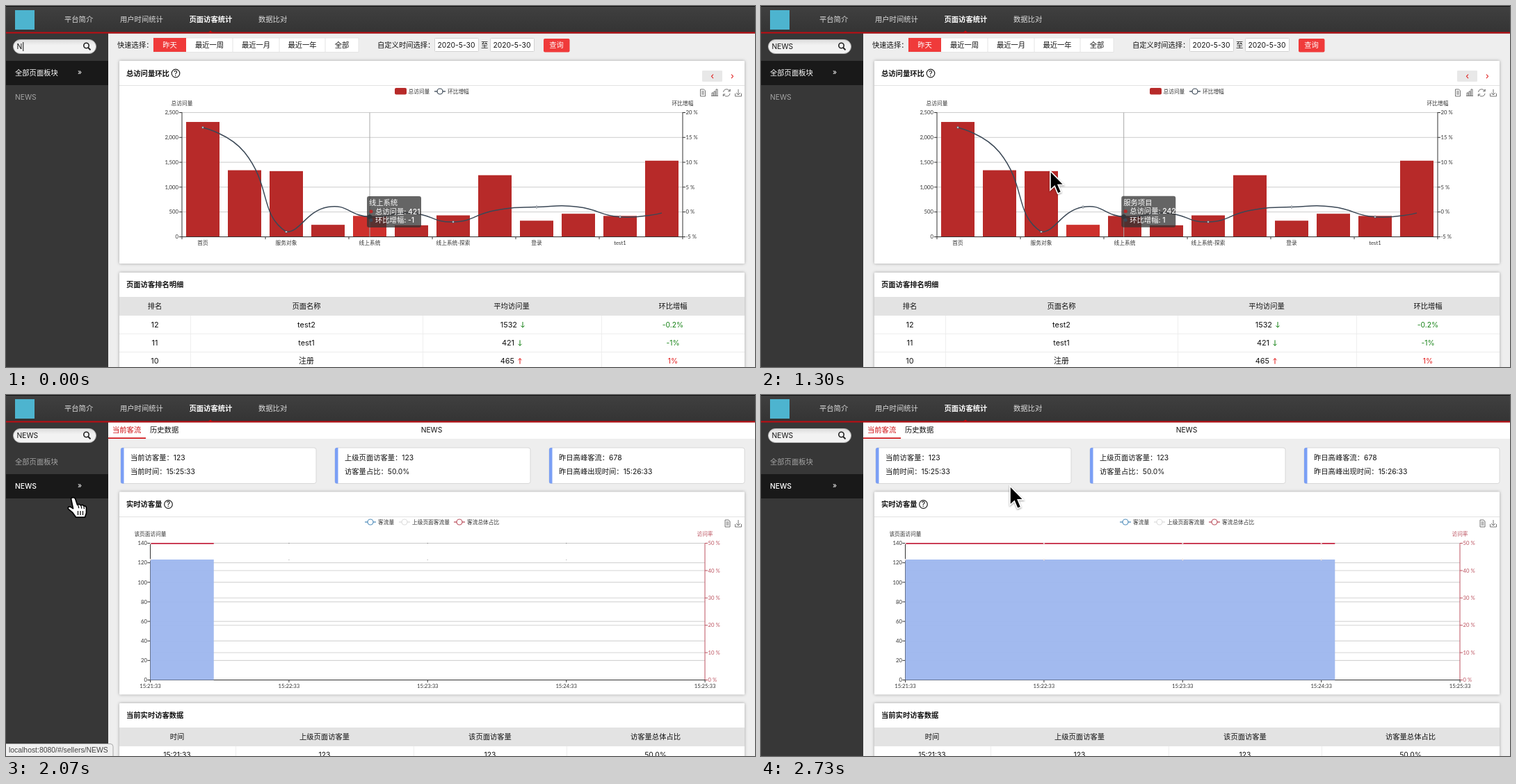
Animation, 1077 px wide and 520 px high, one loop 2.76 s. Source, as an HTML page:

```html
<!DOCTYPE html>
<html lang="zh-CN">
<head>
<meta charset="utf-8">
<style>
html, body { margin: 0; width: 100%; height: 100%; overflow: hidden; background: #eee; }
svg { display: block; width: 1077px; height: 520px; }
text { font: 10.3px Inter, "Noto Sans CJK SC", "Noto Sans CJK", sans-serif; white-space: pre; }
.m { text-anchor: middle; }
.e { text-anchor: end; }
.b { font-weight: 700; }
.w { font-weight: 500; }
.l { font-size: 10.9px; }
.s { font: 7.7px Lato, "Noto Sans CJK SC", "Noto Sans CJK", sans-serif; }
.u { font: 10.4px "Liberation Sans", sans-serif; }
.panel { fill: #fff; filter: drop-shadow(0 0 2px rgba(0,0,0,.32)); }
</style>
</head>
<body>
<svg id="stage" viewBox="0 0 1077 520">
  <defs>
    <linearGradient id="head" x2="0" y2="1"><stop stop-color="#404040"/><stop offset="1" stop-color="#343434"/></linearGradient>
    <linearGradient id="pill" x2="0" y2="1"><stop stop-color="#dcdcdc"/><stop offset=".4" stop-color="#f2f2f2"/></linearGradient>
  </defs>
</svg>
<script>
const RED = '#f03a3a', BAR = '#b72a29', HOT = '#cd302c', INK = '#333', NAVY = '#3b4856', ROSE = '#bc5360';
const LOOP = 2760, PAGE_SWITCH = 1930;
const stage = document.getElementById('stage');

const range = (n, fn) => Array.from({ length: n }, (_, i) => fn(i)).join('');
const text = (x, y, str, cls = '', fill = '#111') => {
  const size = /\bs\b/.test(cls) ? 7.7 : 10.3;
  return `<text x="${x}" y="${y + size * .36}" class="${cls}" fill="${fill}">${str}</text>`;
};
const rect = (x, y, w, h, fill, extra = '') =>
  `<rect x="${x}" y="${y}" width="${w}" height="${h}" fill="${fill}" ${extra}/>`;
const path = (d, stroke, width = 1, fill = 'none', extra = '') =>
  `<path d="${d}" stroke="${stroke}" stroke-width="${width}" fill="${fill}" ${extra}/>`;
const hline = (x1, x2, y, color, w = 1) => path(`M${x1} ${y}H${x2}`, color, w);
const vline = (x, y1, y2, color, w = 1) => path(`M${x} ${y1}V${y2}`, color, w);
const circle = (x, y, r, stroke, fill = '#fff', w = 1) =>
  `<circle cx="${x}" cy="${y}" r="${r}" stroke="${stroke}" fill="${fill}" stroke-width="${w}"/>`;
const panel = (x, y, w, h) => rect(x, y, w, h, '#fff', 'class="panel" rx="1"');
const group = (id, body, extra = '') => `<g id="${id}" ${extra}>${body}</g>`;

const title = (y, str, helpX) => text(173, y, str, 'b') + (helpX
  ? circle(helpX, y, 5.8, '#222', 'none', 1.2) + text(helpX, y, '?', 'm w', '#222') : '');
const ringLegend = (x, y, label, color, stroke = color) =>
  hline(x - 8, x + 8, y, color, 1.3) + circle(x, y, 4, stroke, '#fff', 1.2) + text(x + 11, y, label, 's', INK);

const docIcon = (x, y) => path(`M${x - 3.5} ${y - 5}h5l2 2v8h-7zM${x - 2} ${y - 2}h4m-4 2h4m-4 2h4`, '#666', .9);
const saveIcon = (x, y) => path(`M${x - 4.5} ${y + 1}v4h9v-4M${x} ${y - 5}v8m-3-3l3 3l3-3`, '#666', .9);

function table(y, name, seps, centers, heads) {
  return panel(163, y, 899, 160) + title(y + 17, name) + rect(163, y + 35, 899, 27, '#e3e3e3')
    + heads.map((h, i) => text(centers[i], y + 48.5, h, 'm')).join('')
    + seps.map(x => vline(x + .5, y + 62, 520, '#eee')).join('');
}

// ---------- Shared frame ----------
const navigation = rect(0, 0, 1077, 38, 'url(#head)') + rect(0, 0, 1077, 1, '#111')
  + rect(0, 37.5, 1077, 2, '#c00d12') + path('M291 38l3-2.5l3 2.5z', 'none', 0, '#c00d12')
  + rect(13, 6, 28, 28, '#4db4cf')
  + text(84, 19.5, '平台简介', '', '#ddd') + text(164, 19.5, '用户时间统计', '', '#ddd')
  + text(263.5, 19.5, '页面访客统计', 'b', '#fff') + text(363, 19.5, '数据比对', '', '#ddd');
const search = rect(10.5, 48.5, 119, 20, 'url(#pill)', 'rx="10" stroke="#b5b5b5"')
  + circle(115.5, 57, 3.7, '#222', 'none', 1.6) + path('M118.2 60l3.3 3.4', '#222', 2)
  + group('typed', '') + rect(0, 52, 1, 13, '#111', 'id="caret"');

function menu(active) {
  const item = (i, label, y) => (i === active ? rect(0, y - 17, 147, 35, '#191919') : '')
    + text(13, y, label, i === active ? 'w' : '', i === active ? '#fff' : '#a5a5a5')
    + (i === active ? text(103, y - 1, '»', '', '#fff') : '');
  return item(0, '全部页面板块', 96) + item(1, 'NEWS', 131);
}

// ---------- Overview page ----------
const visits = [2311, 1340, 1322, 242, 421, 232, 432, 1240, 325, 465, 421, 1532];
const growth = [17, 12, -4, 1, -1, -.2, -2, .3, 1, 1, -1, -.2];
const names = ['首页', '平台简介', '服务对象', '服务项目', '线上系统'];
const centerX = i => 283 + 60 * i;
const growthY = v => 296.7 - v * 7.16;
const points = growth.map((v, i) => [centerX(i), growthY(v)]);

function smoothLine(p) {
  const ys = p.map(q => q[1]), low = Math.min(...ys), high = Math.max(...ys);
  const clamp = y => Math.max(low, Math.min(high, y));
  let d = `M${p[0]}`, out = p[0];
  for (let i = 1; i < p.length; i++) {
    const [x, y] = p[i], prev = p[i - 1], next = p[i + 1];
    let into = p[i], leave = p[i];
    if (next) {
      const before = Math.hypot(x - prev[0], y - prev[1]), after = Math.hypot(next[0] - x, next[1] - y);
      const k = after / (before + after), vx = next[0] - prev[0], vy = next[1] - prev[1];
      into = [x - vx * .5 * (1 - k), clamp(y - vy * .5 * (1 - k))];
      leave = [x + vx * .5 * k, clamp(y + vy * .5 * k)];
    }
    d += `C${out} ${into} ${p[i]}`;
    out = leave;
  }
  return d;
}

function filters() {
  const labels = ['昨天', '最近一周', '最近一月', '最近一年', '全部'], edges = [212, 259, 326, 393, 459, 507];
  return text(160, 56, '快速选择：')
    + rect(212, 46, 295, 20.5, '#fff', 'stroke="#e2e2e2" stroke-width=".8"') + rect(212, 46, 47, 20, RED)
    + labels.map((s, i) => text((edges[i] + edges[i + 1]) / 2, 56, s, 'm', i ? '#111' : '#fff')
      + (i > 1 ? vline(edges[i], 46, 66, '#e4e4e4') : '')).join('')
    + text(534, 56, '自定义时间选择：')
    + [616, 696].map(x => rect(x + .5, 46.5, 63, 19, '#fff', 'stroke="#d2d2d2" rx="1"')
      + text(x + 31.5, 56, '2020-5-30', 'm')).join('')
    + text(683, 56, '至') + rect(773, 47, 37.5, 19.5, RED, 'rx="2"') + text(791.5, 56.5, '查询', 'm w', '#fff');
}

function overviewChart() {
  return panel(163, 79, 899, 292) + title(97, '总访问量环比', 244) + hline(163, 1062, 114.5, '#e2e2e2')
    + rect(1001, 93, 29, 16, '#e8e8e8', 'rx="1"')
    + path('M1017 98.5l-2.5 2.8l2.5 2.8M1043 98.5l2.5 2.8l-2.5 2.8', '#e02020', 1.1)
    + rect(559, 118, 17, 9.5, BAR, 'rx="2"') + text(578.5, 123, '总访问量', 's', INK)
    + ringLegend(624, 123, '环比增幅', NAVY)
    + docIcon(1002, 125) + saveIcon(1053, 125)
    + path('M1014 129.5h10M1015 129v-4h2v4M1018 129v-6h2v6M1021 129v-9h2v9', '#666', .9)
    + path('M1031.5 124a4.6 4.6 0 0 1 8.5-2l1.2-2v3h-3M1041 126a4.6 4.6 0 0 1-8.5 2l-1.2 2v-3h3', '#666', .9)
    + text(253, 140, '总访问量', 's m', INK) + text(973, 140, '环比增幅', 's m', INK)
    + range(6, i => {
      const y = 332.5 - 35.8 * i;
      return hline(253, 973, y, '#ccc') + hline(249, 253, y, INK) + hline(973, 977, y, INK)
        + text(248, y, (i * 500).toLocaleString('en-US'), 's e', INK) + text(977.5, y, `${i * 5 - 5} %`, 's', INK);
    })
    + visits.map((v, i) => rect(centerX(i) - 24, 332.5 - v * .0716, 48, v * .0716, BAR, `id="bar${i}"`)).join('')
    + vline(253, 153, 333, INK) + vline(973, 153, 333, INK) + hline(253, 973, 332.5, INK)
    + range(7, i => vline(253 + 120 * i, 332, 336, INK))
    + ['首页', '服务对象', '线上系统', '线上系统-探索', '登录', 'test1']
      .map((s, i) => text(283 + 120 * i, 341.5, s, 's m', INK)).join('')
    + group('axisLine', vline(0, 153.5, 332.5, '#aaa'))
    + path(smoothLine(points), NAVY, 1.5)
    + points.filter((_, i) => i % 2 === 0 && i < 11).map(([x, y]) => circle(x, y, 1.4, NAVY, '#fff', .8)).join('')
    + group('focus', circle(0, 0, 1.4, NAVY, '#fff', .8))
    + group('axisDot', circle(0, 0, 3, NAVY, NAVY))
    + group('tip', '');
}

const overview = rect(147, 39.5, 930, 481, '#eee') + menu(0) + filters() + overviewChart()
  + table(384, '页面访客排名明细', [265, 599, 856], [214, 432, 727, 959], ['排名', '页面名称', '平均访问量', '环比增幅'])
  + [[12, 'test2', 1532, '↓', '-0.2%'], [11, 'test1', 421, '↓', '-1%'], [10, '注册', 465, '↑', '1%']]
    .map(([rank, name, count, arrow, rate], i) => {
      const y = 459 + 26.3 * i, color = arrow === '↓' ? '#128012' : '#e01414', wide = count > 999 ? 4 : 0;
      return text(214, y, rank, 'm l') + text(432, y, name, 'm l') + text(731 + wide, y, count, 'e l')
        + path(arrow === '↓' ? `M${739 + wide} ${y - 4}v8m-2.5-2.5l2.5 2.5l2.5-2.5`
          : `M${739 + wide} ${y + 4}v-8m-2.5 2.5l2.5-2.5l2.5 2.5`, color)
        + text(959, y, rate, 'm', color) + hline(163, 1062, y + 13.2, '#ececec');
    }).join('');

// ---------- Live page ----------
function card(x, first, second) {
  return rect(x, 76, 281, 51.5, '#fff', 'rx="3" stroke="#d0d0d0" stroke-width=".8"')
    + path(`M${x + 4.5} 76h-2q-2.5 0-2.5 2.5v46.500q0 2.500 2.500 2.500h2z`, 'none', 0, '#7b9ff5')
    + text(x + 14, 90.5, first) + text(x + 14, 110.5, second);
}

function liveChart() {
  const left = 207.5, right = 1005, bottom = 410.5, top = 213.5, tickX = i => left + 199.4 * i;
  const dots = (fill, stroke) => range(5, i => circle(tickX(i), top, 1, stroke, fill, .5) + circle(tickX(i), 237.3, 1, stroke, fill, .5));
  return panel(163, 139.5, 899, 292) + title(157.5, '实时访客量', 233.5) + hline(163, 1062, 175.5, '#e2e2e2')
    + ringLegend(524, 183, '客流量', '#5590bd') + ringLegend(573, 183, '上级页面客流量', '#ddd')
    + ringLegend(652, 183, '客流总体占比', ROSE) + docIcon(1037.5, 185) + saveIcon(1053, 185)
    + text(207.5, 200.5, '该页面访问量', 's m', INK) + text(1005, 200.5, '访问率', 's m', ROSE)
    + range(6, i => {
      const y = bottom - 39.4 * i;
      return hline(left, right, y, '#d4d4d4') + hline(right, 1009, y, ROSE) + text(1009.5, y, `${i * 10} %`, 's', ROSE);
    })
    + range(8, i => {
      const y = bottom - 28.14 * i;
      return hline(left, right, y, '#ccc') + hline(203.5, left, y, INK) + text(203, y, i * 20, 's e', INK);
    })
    + range(3, i => hline(tickX(i + 1) - .7, tickX(i + 1) + .7, top, '#888') + hline(tickX(i + 1) - .7, tickX(i + 1) + .7, 237.5, '#bbb'))
    + vline(left, top, bottom, INK) + vline(right, top, bottom, ROSE) + hline(left, right, bottom, INK)
    + range(5, i => vline(tickX(i), 410, 414, INK) + text(tickX(i), 419.5, `15:2${i + 1}:33`, 's m', INK))
    + `<clipPath id="reveal">${rect(207, 205, 0, 206, '#000', 'id="revealRect"')}</clipPath>`
    + group('area', rect(207.5, 237, 797.5, 173.5, '#9fb8ef', 'opacity=".97"')
      + hline(207, 1005, 213.8, '#c3233f', 1.7) + dots('#fff', '#cbb'), 'clip-path="url(#reveal)"');
}

const live = rect(147, 39.5, 930, 481, '#eee') + menu(1)
  + rect(147, 39.5, 930, 23.5, '#fff') + text(153, 50.5, '当前客流', 'w', '#d01216') + rect(147, 61.3, 54, 1.7, '#d01216')
  + text(207, 50.5, '历史数据') + text(612, 50.5, 'NEWS', 'm')
  + card(165, '当前访客量：123', '当前时间：15:25:33') + card(473, '上级页面访客量：123', '访客量占比：50.0%')
  + card(781, '昨日高峰客流：678', '昨日高峰出现时间：15:26:33') + liveChart()
  + table(444, '当前实时访客数据', [330, 586, 806], [246, 458, 696, 934], ['时间', '上级页面访客量', '该页面访客量', '访客量总体占比'])
  + ['15:21:33', '123', '123', '50.0%'].map((s, i) => text([246, 458, 696, 934][i], 518.5, s, 'm')).join('');

const status = rect(-4, 502.5, 158, 24, '#f0f0f0', 'rx="4" stroke="#aaa"') + text(4, 511.5, 'localhost:8080/#/sellers/NEWS', 'u', '#444');
const arrow = path('M0 0V27.500L6.300 21.800L10.800 32.500L15.800 30.400L11.300 19.900H19.500Z', '#fff', 1.6, '#000',
  'style="filter:drop-shadow(0 1px 1px rgba(0,0,0,.4))"');
const hand = path('M-3 1Q0-2 3 1L6 10Q9 8 11 11Q14 9 15.500 12Q18.500 11 19 14.500L19 22L17 28H4L-1 21L-7 16Q-8 12-4 13L0 15.500Z', '#000', 1.7, '#fff',
  'stroke-linejoin="round"') + path('M7 10l1.300 5M11.500 11.500l.800 4M15.500 13l.400 3M7 19v6M10.500 19v6M14 19v6', '#000', 1.2);

stage.insertAdjacentHTML('beforeend', rect(0, 0, 1077, 520, '#373737')
  + group('overview', overview) + group('live', live) + navigation + search
  + group('status', status) + group('arrow', arrow) + group('hand', hand));

// ---------- Motion ----------
const el = id => document.getElementById(id);
const show = (id, on) => el(id).setAttribute('visibility', on ? 'visible' : 'hidden');
const move = (id, x, y) => el(id).setAttribute('transform', `translate(${x} ${y})`);

// Linear interpolation through [time, value] keys.
function track(keys, t) {
  const i = keys.findIndex(k => k[0] > t);
  if (i === 0) return keys[0][1];
  if (i < 0) return keys.at(-1)[1];
  const [t0, a] = keys[i - 1], [t1, b] = keys[i];
  return a + (b - a) * (t - t0) / (t1 - t0);
}

const mouseX = [[1130, 499], [1200, 480], [1300, 417], [1440, 262], [1570, 145], [1680, 108], [1800, 96], [2070, 95], [2130, 125], [2300, 273], [2420, 325], [2560, 354], [2650, 358]];
const mouseY = [[1130, 256], [1300, 238], [1440, 188], [1570, 148], [1700, 138], [1800, 137], [1950, 137], [2070, 148], [2180, 159], [2300, 154], [2430, 139], [2650, 131]];
const revealed = [[1953, 0], [2070, 90.5], [2300, 266], [2730, 617], [2760, 641]];

function drawTip(t) {
  const index = [1270, 1345, 1400, 1440].reduce((i, time) => i - (t >= time), 4);
  const opacity = track([[1470, 1], [1550, 0]], t), active = opacity > 0;
  const px = track([[1300, 523], [1480, 283]], t), slot = (px - 283) / 60, base = Math.min(10, Math.floor(slot));
  const py = points[base][1] + (points[base + 1][1] - points[base][1]) * (slot - base);
  visits.forEach((_, i) => el('bar' + i).setAttribute('fill', active && i === index ? HOT : BAR));
  move('axisLine', px, 0);
  move('axisDot', px, py);
  move('focus', ...points[index]);
  ['axisLine', 'axisDot', 'focus', 'tip'].forEach(id => el(id).setAttribute('opacity', opacity));
  move('tip', track([[1300, 519], [1550, 330]], t), track([[1300, 274], [1550, 205]], t));
  el('tip').innerHTML = rect(0, 0, 78, 45, 'rgba(50,50,50,.75)', 'rx="3"') + text(3, 9.5, names[index], 'w', '#fff')
    + circle(6, 22, 2.5, 'none', BAR) + circle(6, 34.500, 2.5, 'none', NAVY)
    + text(12, 22, `总访问量: ${visits[index]}`, 'w', '#fff') + text(12, 34.5, `环比增幅: ${growth[index]}`, 'w', '#fff');
}

function draw(t) {
  const letters = 1 + [200, 370, 530].filter(time => t >= time).length;
  el('typed').innerHTML = text(15.5, 58.5, 'NEWS'.slice(0, letters));
  el('caret').setAttribute('x', 16.5 + el('typed').firstChild.getComputedTextLength());
  show('caret', t < 1130);

  const onLive = t >= PAGE_SWITCH;
  el('overview').style.display = onLive ? 'none' : '';
  el('live').style.display = onLive ? '' : 'none';
  if (onLive) el('revealRect').setAttribute('width', track(revealed, t) + .5);
  else drawTip(t);

  show('status', t >= 1690);
  el('status').setAttribute('opacity', track([[2640, 1], [2730, 0]], t));
  const x = track(mouseX, t), y = track(mouseY, t), overMenu = x < 147;
  show('arrow', t >= 1130 && !overMenu);
  show('hand', overMenu);
  move('arrow', x, y);
  move('hand', x + 1, y);
}

function tick() {
  draw(performance.now() % LOOP);
  requestAnimationFrame(tick);
}
tick();
</script>
</body>
</html>
```
